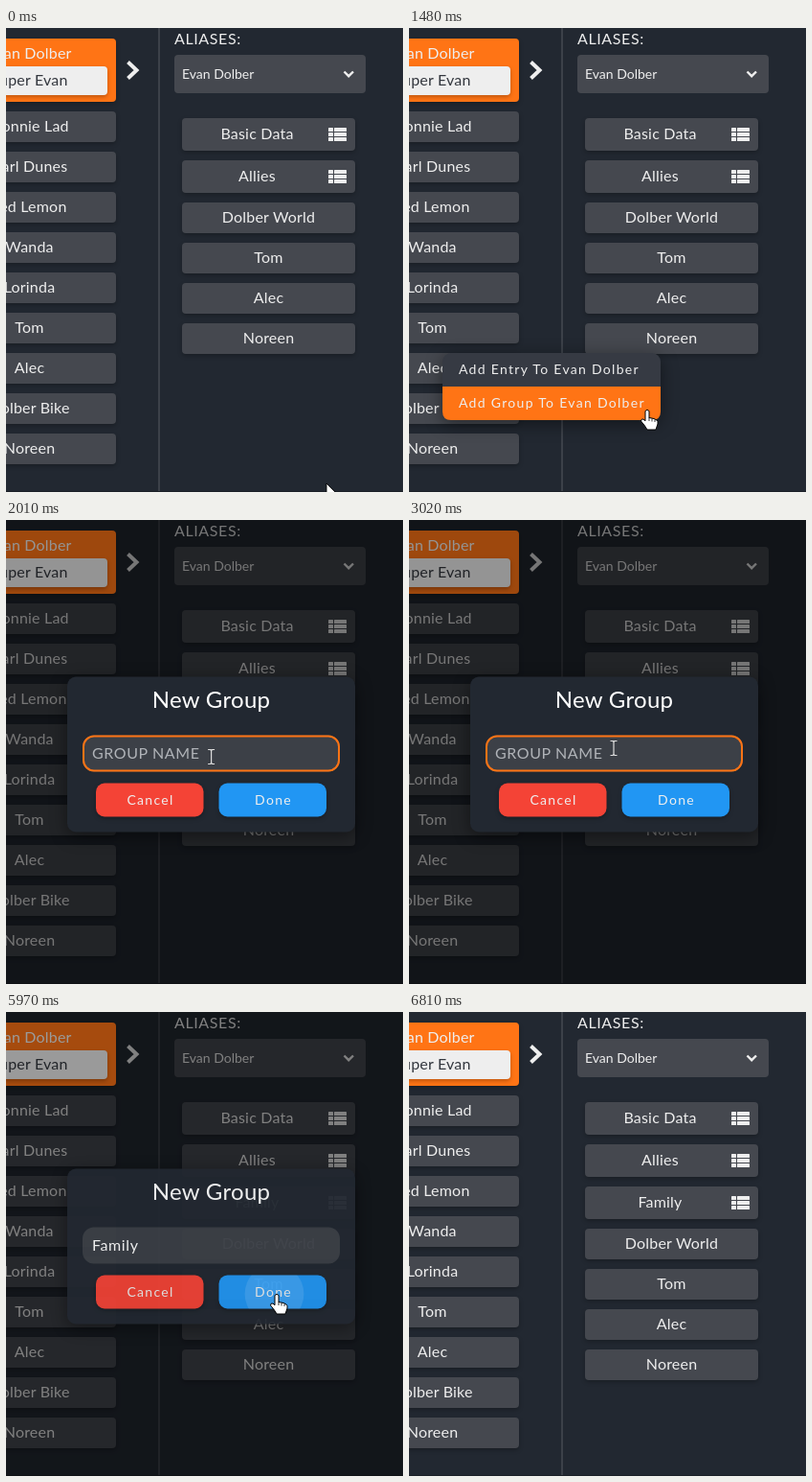
Write an HTML page that moves like this. It is 415 px wide and 484 px high and loops after 7890 ms.

```html
<!DOCTYPE html>
<html lang="en">
<head>
<meta charset="utf-8">
<title>New group dialog</title>
<style>
  html, body { margin: 0; width: 100%; height: 100%; overflow: hidden; background: #222831; }
  svg { display: block; width: 415px; height: 484px; }
  text { font: 16px Lato, "Open Sans", sans-serif; letter-spacing: .2px; fill: #eee; white-space: pre; }
  .mid { text-anchor: middle; }
  .small { font-size: 14px; letter-spacing: 0; }
  .wide { font-size: 14px; letter-spacing: 1.3px; }
  .title { font-size: 24px; letter-spacing: .3px; fill: #fff; }
  .caps { letter-spacing: .6px; }
  .low { filter: drop-shadow(0 2px 2px rgba(0,0,0,.25)); }
  .high { filter: drop-shadow(0 4px 9px rgba(0,0,0,.45)); }
</style>
</head>
<body>
<svg id="stage" viewBox="0 0 415 484" xmlns="http://www.w3.org/2000/svg"></svg>
<script>
const LOOP = 7890, STEPS = 102, STEP = LOOP / STEPS;
const ORANGE = '#ff7415', GREY = '#45484f';
const HERO = 'Evan Dolber';

const rect = (x, y, w, h, r, fill, extra = '') =>
  `<rect x="${x}" y="${y}" width="${w}" height="${h}" rx="${r}" fill="${fill}" ${extra}/>`;
const text = (x, y, str, cls = '', extra = '') =>
  `<text x="${x}" y="${y}" class="${cls}" ${extra}>${str}</text>`;
const chevron = (d, w) =>
  `<path d="${d}" fill="none" stroke="#eee" stroke-width="${w}"/>`;

function listIcon(x, y) {
  let s = '';
  for (let i = 0; i < 3; i++)
    s += rect(x, y + i * 5, 5, 4, .6, '#eee') + rect(x + 6, y + i * 5, 13, 4, .6, '#eee');
  return s;
}

// a group's label is centred in the space left of its icon
function button(x, y, label, group) {
  const h = group ? 34 : 32, mid = x + (group ? 78.5 : 90.5);
  return rect(x, y, 181, h, 4, GREY) + text(mid, y + h / 2 + 4.7, label, 'mid') +
    (group ? listIcon(x + 153, y + 10) : '');
}

function column(x, y, groups, entries) {
  let s = '';
  for (const g of groups) { s += button(x, y, g, true); y += 44; }
  for (const e of entries) { s += button(x, y, e, false); y += 42; }
  return s;
}

const people = ['Donnie Lad', 'Carl Dunes', 'Ted Lemon', 'Wanda', 'Lorinda', 'Tom', 'Alec', 'Dolber Bike', 'Noreen'];
const entries = ['Dolber World', 'Tom', 'Alec', 'Noreen'];
const groups = ['Basic Data', 'Allies'];

document.getElementById('stage').innerHTML = `
  <defs><clipPath id="doneClip">${rect(222.5, 274.5, 112.5, 35, 9, '#000')}</clipPath></defs>
  ${rect(0, 0, 415, 484, 0, '#222831')}
  ${rect(159, 0, 2, 483, 0, '#3c4149')}
  ${rect(0, 483, 415, 1, 0, '#1a1f26')}
  <g class="low">${column(-66, 87, [], people)}</g>
  ${chevron('M127.5 35.5L136.5 44L127.5 52.5', 4)}
  ${text(176, 17, 'ALIASES:', 'caps')}
  ${rect(176, 28, 200, 40, 4, GREY)}
  ${text(184, 53, HERO, 'small')}
  ${chevron('M353.5 45.5L358.2 50.2L363 45.5', 2.4)}
  <g class="low" id="before">${column(184, 94, groups, entries)}</g>
  <g class="low" id="after">${column(184, 94, [...groups, 'Family'], entries)}</g>
  <g id="menu" class="high">
    ${rect(35, 339, 228, 70, 9, '#363a43')}
    <path id="hover" d="M35 374h228v26q0 9-9 9h-210q-9 0-9-9z" fill="${ORANGE}"/>
    ${text(52, 361, 'Add Entry To ' + HERO, 'wide')}
    ${text(52, 396, 'Add Group To ' + HERO, 'wide')}
  </g>
  <rect id="shade" width="415" height="484" fill="#000"/>
  <g id="card">
    <g class="low">${rect(-66, 11, 181, 66, 4, ORANGE)}</g>
    ${text(24.5, 32, HERO, 'mid')}
    <g class="low">${rect(-57, 40, 163, 30, 4, '#eee')}</g>
    ${text(24.5, 60, 'Super Evan', 'mid', 'style="fill:#33373e"')}
  </g>
  <g id="dialog">
    <g class="high">${rect(64, 163.5, 301, 162, 9, '#222831')}</g>
    ${text(214.5, 196, 'New Group', 'title mid')}
    ${rect(80, 224.5, 269, 38, 12, '#3c4047')}
    ${rect(81, 225.5, 267, 36, 11, 'none', `id="ring" stroke="${ORANGE}" stroke-width="2"`)}
    ${text(90, 248.7, 'GROUP NAME', 'caps', 'id="hint" style="fill:#b0b3b8"')}
    ${text(90, 248.7, '', '', 'id="typed" style="fill:#fff;letter-spacing:.6px"')}
    ${rect(90, 235, 1.5, 19, 0, ORANGE, 'id="caret"')}
    <g class="low">${rect(94, 274.5, 112.5, 35, 9, '#f44336')}${rect(222.5, 274.5, 112.5, 35, 9, '#2196f3')}</g>
    <g clip-path="url(#doneClip)"><circle id="ripple" cx="280.5" cy="294" fill="#fff"/></g>
    ${text(151, 296.7, 'Cancel', 'wide mid')}
    ${text(279.5, 296.7, 'Done', 'wide mid')}
  </g>
  <g id="cursor" stroke-linejoin="round">
    <path id="arrow" d="M0 0V16.5L3.9 12.9L6.6 19L9.2 17.9L6.6 11.9H12Z" fill="#fff" stroke="#000" stroke-width=".9"/>
    <g id="hand" stroke="#000">
      <path d="M-2 1.5q2-2.5 4 0v7l5 1 3 1.5q1.5 1 1 4l-2 6h-9l-2.5-4-4-5q0-2.5 2.5-2l2 1.8z" fill="#fff"/>
      <path d="M2 8v4M5 9.5v3M8 10.5v2.5" fill="none" stroke-width=".8"/>
    </g>
    <path id="beam" d="M-3.5-7.5h2.5l1 1 1-1h2.5M0-6.5v13M-3.5 7.5h2.5l1-1 1 1h2.5" fill="none" stroke="#ddd" stroke-width="1.2"/>
  </g>`;

const el = {};
for (const n of document.querySelectorAll('[id]')) el[n.id] = n;
const show = (n, on) => n.setAttribute('display', on ? 'inline' : 'none');
const fade = (n, o) => { n.setAttribute('opacity', o); show(n, o > 0); };
const seg = (t, a, b) => Math.min(1, Math.max(0, (t - a) / (b - a)));
const inOut = u => u < .5 ? 2 * u * u : 1 - 2 * (1 - u) * (1 - u);

// cursor stops: time, x, y
const path = [
  [0, 335, 475], [390, 264, 410], [560, 264, 410], [850, 250, 399], [1005, 249, 398],
  [1560, 249, 398], [2090, 213, 240], [2230, 213, 240], [2320, 214, 238],
  [5190, 214, 238], [5420, 283, 306], [5640, 283, 306], [5740, 283, 294],
  [6020, 283, 294], [6650, 387, 474], [6730, 389, 476]
];
const keys = [3325, 3550, 3700, 3865, 4015, 4245];

function cursorAt(t) {
  let i = 0;
  while (i < path.length - 2 && t > path[i + 1][0]) i++;
  const [a, ax, ay] = path[i], [b, bx, by] = path[i + 1];
  const u = inOut(seg(t, a, b));
  return [ax + (bx - ax) * u, ay + (by - ay) * u];
}

function caretOn(t) {
  if (t < 3300) return t < 2010 || (t > 2540 && t < 3010);
  return t < 4710 || (t > 5250 && t < 5730);
}

function draw(time) {
  const t = Math.floor((time + 8) / STEP) % STEPS * STEP;
  const [x, y] = cursorAt(t);

  const menuOpen = t > 400 && t < 1500;
  fade(el.menu, menuOpen ? seg(t, 400, 560) : 0);
  const onMenu = menuOpen && x < 263 && y < 409;
  show(el.hover, onMenu && y > 374);

  const enter = 1 - (1 - seg(t, 1480, 1765)) ** 4;
  const leave = inOut(seg(t, 5870, 6310));
  const open = enter * (1 - leave);
  fade(el.shade, open * .5);
  fade(el.dialog, open);
  // the selected card stays a little brighter than the rest
  el.card.style.filter = open > 0 ? `brightness(${1 - open * .38})` : 'none';

  const added = t > 5870;
  show(el.before, !added);
  show(el.after, added);
  show(el.ring, !added);

  const count = keys.filter(k => t >= k).length;
  el.typed.textContent = 'Family'.slice(0, count);
  show(el.hint, count === 0);
  el.caret.setAttribute('x', 90 + (count ? el.typed.getComputedTextLength() : 0));
  show(el.caret, caretOn(t));

  const wave = seg(t, 5800, 6250);
  el.ripple.setAttribute('r', 89 * wave);
  fade(el.ripple, added ? .18 * (1 - wave) : 0);

  const inDialog = open > .5;
  const onDone = inDialog && x > 222 && x < 335 && y > 275 && y < 310;
  const onField = inDialog && x > 80 && x < 349 && y > 225 && y < 263;
  const hand = onMenu || onDone || (t > 1400 && t < 1600);
  el.cursor.setAttribute('transform', `translate(${x} ${y})`);
  show(el.cursor, t < 6780);
  show(el.hand, hand);
  show(el.beam, onField && !hand);
  show(el.arrow, !hand && !onField);
}

const start = performance.now();
function tick() {
  draw((performance.now() - start) % LOOP);
  requestAnimationFrame(tick);
}
draw(0);
requestAnimationFrame(tick);
</script>
</body>
</html>
```
